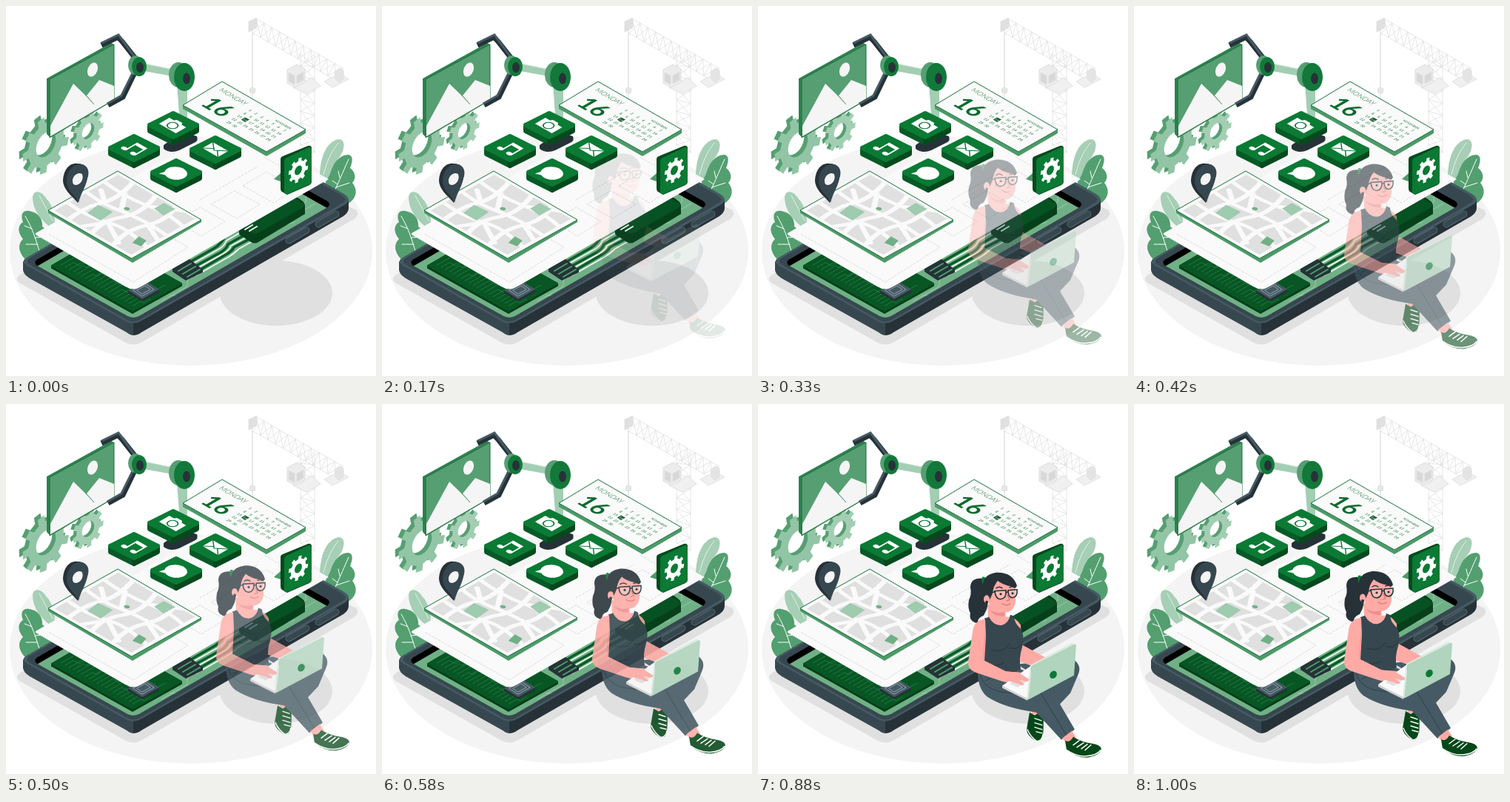
These frames come from a looping animation (500 px wide and 500 px high, 1040 ms). An HTML page:

```html
<!DOCTYPE html>
<html lang="en">
<head>
<meta charset="utf-8">
<title>Building an app</title>
<style>
html, body { margin: 0; width: 100%; height: 100%; overflow: hidden; background: #fff }
svg { display: block; width: 100vw; height: 100vh }
text { font-family: Lato, "Open Sans", sans-serif; fill: #0a6b2d }
.line { fill: none; stroke-linecap: round; stroke-linejoin: round }
</style>
</head>
<body>
<svg viewBox="0 0 500 500">
  <ellipse cx="250" cy="331" rx="245" ry="155" fill="#f4f4f4"/>
  <path d="M18 364L300 200L472 275Q480 281 470 288L184 454Q172 461 160 454L18 374Q12 369 18 364Z" fill="#e0e0e0"/>
  <ellipse cx="365" cy="388" rx="76" ry="44" fill="#e0e0e0"/>

  <!-- crane -->
  <g stroke="#e0e0e0">
    <g id="crane" class="line"></g>
    <path d="M328 21L339 16V29L328 35Z" fill="#e0e0e0"/>
    <path class="line" d="M333 30V110M333 117V130" stroke-width="1.4"/>
    <circle cx="333" cy="114" r="4" fill="#e6e6e6"/>
    <path d="M388 110L413 97L425 108L406 119Z" fill="#f0f0f0"/>
    <path d="M380 86L393 79L404 85V103L391 110L380 104Z" fill="#ececec"/>
    <path d="M382 90L390 94V106L382 102ZM393 94L402 89V100L393 105Z" fill="#d8d8d8"/>
    <path d="M430 102L451 91L463 99L441 110Z" fill="#f0f0f0"/>
    <path d="M445 88L451 84L456 87V99L450 103L445 99Z" fill="#e4e4e4"/>
  </g>

  <!-- plants -->
  <g fill="#a6cfb5">
    <path d="M424 232C424 206 432 184 449 180C462 180 456 200 448 207C444 217 440 230 434 239Z"/>
    <path d="M64 302C46 290 36 274 36 259C37 247 49 250 55 261C60 265 65 277 66 292Z"/>
  </g>
  <g fill="#539f6f">
    <path d="M428 247C432 238 434 235 438 227C442 213 450 201 463 201C470 203 468 211 465 219C472 224 474 233 468 239C477 250 472 262 462 267L430 252Z"/>
    <path d="M26 342C15 331 17 320 23 315C15 305 16 296 23 292C18 279 25 274 35 278C46 280 50 292 49 298C58 304 64 318 59 326Z"/>
  </g>
  <g class="line" stroke="#fff">
    <path d="M441 256C448 242 455 225 463 207M451 232L449 223M448 241L441 236M446 245L464 239"/>
    <path d="M26 284C35 299 40 314 45 331M35 301L25 297M39 313L51 312M42 322L27 322"/>
    <path d="M429 228C433 211 440 196 449 185M45 256C51 268 58 280 63 290" stroke="#e3f0e8"/>
  </g>

  <!-- gears and picture -->
  <g id="gears"></g>
  <path d="M55 98L142 50L146 52L60 99V178L55 173Z" fill="#2f8150"/>
  <path d="M59 99L146 52V127L59 178Z" fill="#569f72" stroke="#17703a"/>
  <path d="M60 176V162L91 105L119 132L109 121L126 100L146 108V126Z" fill="#f5f5f5"/>
  <path d="M107 120L119 133" stroke="#569f72"/>
  <ellipse cx="117" cy="86" rx="6.5" ry="10" transform="rotate(22 117 86)" fill="#f5f5f5"/>

  <!-- phone -->
  <path d="M23 345V357Q24 363 32 368L163 441Q168 445 172 445V425Z" fill="#37474f"/>
  <path d="M172 445Q178 445 183 441L456 284Q463 279 463 273V261L172 425Z" fill="#263238"/>
  <path d="M28 340L307 178Q315 174 323 178L457 254Q469 262 457 269L182 426Q172 431 162 426L29 351Q19 345 28 340Z" fill="#455a64"/>
  <path d="M31 341L307 181Q315 177 323 181L454 256Q463 262 454 267L181 424Q172 429 163 424L31 349Q26 345 31 341Z" fill="#37474f"/>
  <clipPath id="screen"><path d="M43 342L297 195Q304 191 311 195L433 263Q441 268 433 273L180 419Q172 423 164 419L42 351Q36 346 43 342Z"/></clipPath>
  <g clip-path="url(#screen)">
    <path d="M0 150H500V450H0Z"/>
    <path d="M38 354L304 200L441 277L172 432Z" fill="#70b086"/>
    <path d="M62 351L127 313L237 375V378L171 415L62 354Z" fill="#063c18" stroke="#063c18" stroke-linejoin="round" stroke-width="2"/>
    <path d="M62 351L127 313L237 375L171 412Z" fill="#075623" stroke="#075623" stroke-linejoin="round" stroke-width="2"/>
    <g id="traces" class="line" stroke="#2e8750" stroke-width=".7"></g>
    <path class="line" d="M210 399L245 379V370L268 358M222 391L246 391M358 292L405 265V257M368 303L368 295L418 267M344 306L390 292M275 370L320 344L328 346" stroke="#9bcaab"/>
    <g class="line" stroke-width="3.5">
      <path d="M238 352L282 327Q290 322 296 312L322 297M246 357L290 333Q298 328 300 322L332 304M253 362L297 336Q306 331 308 326L346 306" stroke="#0b5b28"/>
      <path d="M242 354L285 330Q294 326 298 317L327 300M250 359L293 335Q302 330 304 324L339 305M257 364L301 339Q309 334 315 328L351 308" stroke="#f3f8f5" stroke-width="1.8"/>
    </g>
    <path d="M225 355L248 342L266 356V360L243 371L225 359Z" fill="#263238"/>
    <path class="line" d="M233 358L250 348M239 362L256 352M245 366L262 356" stroke="#4aa068" stroke-width="2"/>
    <path d="M165 385L188 372L207 384V387L184 399L165 388Z" fill="#263238"/>
    <path d="M165 384L188 371L207 383L184 396Z" fill="#455a64"/>
    <path class="line" d="M172 384L188 375L200 383L184 392ZM177 384L188 378L195 383L184 389Z" stroke="#a8b5ba" stroke-width=".8"/>
  </g>
  <path d="M315 294L384 258Q390 256 396 260L401 264Q404 266 404 271V281L341 319Q336 322 331 319L317 310Q314 308 315 304Z" fill="#06401a"/>
  <path d="M316 293L384 257L402 267Q405 270 400 273L342 306Q336 309 331 306Z" fill="#075222"/>
  <path class="line" d="M323 302L333 296M329 304L339 298" stroke="#fff" stroke-width="2"/>
  <g class="line" stroke-width="9">
    <path d="M382 317L406 303M422 295L446 281" stroke="#53666f"/>
    <path d="M382 317L406 303M422 295L446 281" stroke="#37474f" stroke-width="7"/>
  </g>

  <!-- sheet -->
  <path d="M40 307L302 158L436 234L183 379Q172 386 161 379L40 309Z" fill="#fafafa"/>
  <g class="line" stroke="#d9d9d9" stroke-width=".9" stroke-dasharray="3 2">
    <path d="M59 309L172 373L246 326L222 312M277 268L309 250L343 268L312 287ZM230 290L262 272L296 291L264 311ZM320 243L352 224L393 247L362 266ZM262 262L340 217M350 205L400 233"/>
  </g>

  <!-- robot arm -->
  <path d="M213 188V193Q222 200 234 195L256 184Q260 181 258 176L238 170Z" fill="#263238"/>
  <path d="M231 106H245V160H235Z" fill="#a3ceb3"/>
  <path d="M187 78L231 87V96L187 88Z" fill="#a3ceb3"/>
  <path d="M187 78L231 87" stroke="#c4e0ce"/>
  <ellipse cx="233" cy="93" rx="13" ry="17" fill="#569f72"/>
  <ellipse cx="241" cy="96" rx="14" ry="19" fill="#12793a"/>
  <ellipse cx="244" cy="98" rx="5" ry="7.5" fill="#263238"/>
  <g class="line" stroke-width="7" style="stroke-linejoin:miter;stroke-linecap:butt">
    <path d="M129 53L151 42L157 48L175 71M138 134L158 123L173 92" stroke="#263238"/>
    <path d="M129 50L152 39L174 69M137 132L156 121L171 91" stroke="#455a64" stroke-width="3"/>
  </g>
  <ellipse cx="175" cy="80" rx="10" ry="13" fill="#569f72"/>
  <ellipse cx="180" cy="82" rx="10" ry="13" fill="#12793a"/>
  <ellipse cx="181" cy="83" rx="5" ry="7" fill="#263238"/>

  <!-- calendar -->
  <path d="M239 134L352 197L405 167V172L352 203L239 139Z" fill="#4d9a69"/>
  <path d="M239 134L292 102L405 167L352 197Z" fill="#fafafa" stroke="#17703a"/>
  <g id="calendar"></g>

  <g id="tiles"></g>

  <!-- map -->
  <path d="M57 276L170 341L264 289V292L171 347L57 280Z" fill="#4d9a69"/>
  <path d="M57 276L151 223L264 289L170 341Z" fill="#fafafa"/>
  <clipPath id="sheet"><path d="M4 4H96V96H4Z"/></clipPath>
  <g transform="matrix(.94 -.53 1.13 .65 57 276)" clip-path="url(#sheet)">
    <path d="M4 4H96V96H4Z" fill="#e0e0e0"/>
    <path class="line" d="M0 22Q30 18 48 24T100 20M0 51Q25 42 45 51T100 47M0 76Q30 66 52 74T100 70M24 0Q20 30 28 48T24 100M52 0Q46 20 52 44T54 100M77 0Q72 30 78 55T76 100M0 35L28 48M52 44L77 28M54 74L40 100M28 48L10 76M78 55L100 85M52 24L64 10" stroke="#fafafa" stroke-width="5"/>
    <path d="M25 26L43 24L45 40L25 42ZM79 61H93L94 74H77Z" fill="#9fcbaf"/>
    <path d="M20 84L33 81V90L22 93Z" fill="#71b087"/>
    <circle cx="59" cy="45" r="2.6" fill="#71b087"/>
  </g>
  <path class="line" d="M57 276L151 223L264 289L170 341Z" stroke="#17703a"/>

  <!-- pin -->
  <path fill-rule="evenodd" d="M97 266C90 257 77 249 77 235C78 220 87 211 97 213C109 213 113 222 110 232C107 246 99 253 97 266ZM95 242C102 241 106 233 103 227C96 223 89 231 89 237Q90 242 95 242Z" fill="#263238"/>
  <path fill-rule="evenodd" d="M98 266C94 255 82 250 82 236C83 222 92 212 102 214C112 216 113 225 110 233C107 247 101 253 98 266ZM95 243C103 240 106 231 102 226C95 224 89 231 90 238Q91 243 95 243Z" fill="#37474f"/>

  <!-- settings -->
  <path d="M362 234L372 225L377 239Z" fill="#4d9a69"/>
  <path d="M371 207Q371 204 374 203L408 189Q412 188 413 191V238Q413 240 410 242L380 255L373 251Q371 250 371 246Z" fill="#06491d"/>
  <path d="M376 210Q376 206 379 205L409 191Q413 190 413 194V236Q413 239 410 241L380 254Q376 255 376 251Z" fill="#0a7a34"/>
  <g id="settings"></g>

  <!-- woman -->
  <g id="woman" opacity="0">
    <path d="M350 350L424 342Q438 350 433 363L422 389L386 427L363 407L395 378Z" fill="#455a64"/>
    <path d="M371 405L382 409L381 419L370 417Z" fill="#ffaaa5"/>
    <path d="M367 415L374 419L384 413Q387 429 385 446Q384 455 376 454Q363 446 363 438Z" fill="#064719"/>
    <path class="line" d="M364 438Q368 448 377 454Q384 453 385 445M374 423L383 426M374 429L384 432M374 435L384 438M376 441L384 443" stroke="#fff" stroke-width="1.4"/>
    <path d="M354 322L394 344Q401 351 391 354L375 354L350 345Z" fill="#ffaaa5"/>
    <path d="M297 356L347 354Q372 360 382 384Q394 382 400 390L428 438L410 452L376 415Q333 409 310 394Q296 383 297 356Z" fill="#455a64"/>
    <path class="line" d="M300 364Q304 380 323 386Q347 391 370 390M381 387L417 446M307 372L314 369" stroke="#2f3e46" stroke-width=".9"/>
    <path d="M411 450L424 440L430 449L418 458Z" fill="#ffaaa5"/>
    <path d="M415 453Q421 457 426 448Q437 455 451 457Q464 459 464 465Q461 474 444 476Q430 476 417 466Z" fill="#064719"/>
    <path class="line" d="M416 465Q430 475 444 474Q458 473 463 466M426 459L434 453M431 462L440 456M437 464L445 458M442 466L450 459" stroke="#fff" stroke-width="1.5"/>

    <path d="M306 234Q287 232 287 246Q289 255 285 263Q283 274 287 281Q284 292 298 295Q295 288 305 284Q314 270 310 251Z" fill="#263238"/>
    <path d="M303 232Q308 230 309 238L306 244Q301 240 303 232Z" fill="#0a7a34"/>
    <path d="M310 268L334 276L335 286Q347 284 355 297L356 320H299L302 291L311 287Z" fill="#ffaaa5"/>
    <path d="M313 276Q323 283 333 279L333 285Q319 286 313 276Z" fill="#ee8f8c"/>
    <path d="M306 288L312 286Q319 299 330 297Q339 294 341 283L346 285Q346 294 355 302Q361 312 357 327Q352 342 355 356Q334 370 301 361L303 330Z" fill="#37474f"/>
    <path class="line" d="M315 330Q331 336 339 323M341 328Q352 331 356 322M312 350Q323 354 332 348" stroke="#263238" stroke-width=".9"/>
    <path d="M307 289Q292 290 290 306L284 347Q283 357 294 361L330 373L350 378Q359 377 366 373L365 367L354 361L336 360L306 345L308 312Z" fill="#ffaaa5"/>
    <path class="line" d="M307 310L304 345" stroke="#ee8f8c" stroke-width=".8"/>

    <path d="M310 250Q306 228 328 230Q346 231 348 247V265Q346 279 334 280Q319 280 312 267Z" fill="#ffaaa5"/>
    <path d="M304 245Q303 229 322 226Q344 225 350 244Q348 249 343 245Q329 242 324 237Q318 244 317 254L314 261L310 267Q305 255 304 245Z" fill="#263238"/>
    <ellipse cx="309" cy="262" rx="4" ry="5.5" fill="#ffaaa5"/>
    <circle cx="309" cy="266" r="2" fill="#263238"/>
    <path class="line" d="M322 247Q326 244 330 247M340 246Q344 244 347 246M312 254L320 252M335 253L338 252" stroke="#263238" stroke-width="1.5"/>
    <path d="M320 251L335 250Q336 261 328 262Q321 262 320 251ZM338 250L350 249Q351 259 344 260Q338 260 338 250Z" fill="#fff" fill-opacity=".2" stroke="#263238" stroke-width="1.6"/>
    <circle cx="328" cy="255" r="1.6" fill="#263238"/><circle cx="344" cy="254" r="1.6" fill="#263238"/>
    <path class="line" d="M337 256L340 263L336 264M330 268Q336 272 341 268" stroke="#d56f70" stroke-width="1.2"/>

    <path d="M330 379L369 352L370 390L364 398Z" fill="#fafafa"/>
    <path d="M330 379L364 396V399L330 382Z" fill="#d3d3d3"/>
    <path d="M340 376L354 367L365 372L351 381Z" fill="#e0e0e0"/>
    <path d="M331 359L352 361L366 370Q367 374 361 373L353 371L360 377Q357 380 351 376L336 372Z" fill="#ffaaa5"/>
    <path d="M370 352L427 323Q430 322 430 325L427 365L365 398Z" fill="#b0d4bd"/>
    <path d="M370 352L427 323L425 321L368 351L363 397H365Z" fill="#d8eadf"/>
    <ellipse cx="399" cy="364" rx="4.5" ry="5.5" transform="rotate(35 399 364)" fill="#0a7a34"/>
  </g>
</svg>
<script>
const $ = id => document.getElementById(id);
const flat = (x, y) => `transform="matrix(.87 .5 -.87 .5 ${x} ${y})"`;

// Lattice between two parallel edges, each given as [x1, y1, x2, y2]
function truss(a, b, n) {
  const at = ([x, y, u, v], k) => `${x + (u - x) * k} ${y + (v - y) * k}`;
  let d = `M${at(a, 0)}L${at(a, 1)}M${at(b, 0)}L${at(b, 1)}`;
  for (let i = 0; i < n; i++) {
    const p = i / n, q = (i + 1) / n;
    d += `M${at(a, p)}L${at(b, q)}L${at(a, q)}M${at(b, p)}L${at(a, q)}`;
  }
  return `<path d="${d}" stroke-width=".8"/>`;
}
$('crane').innerHTML = truss([338, 17, 455, 84], [334, 37, 445, 100], 11) +
  truss([398, 65, 398, 188], [417, 65, 417, 198], 8);

function gear(r, n, hole, turn = 0) {
  const points = [];
  for (let i = 0; i < n; i++)
    for (const [k, s] of [[-.27, .77], [-.2, 1], [.2, 1], [.27, .77]]) {
      const a = (i + k) / n * 2 * Math.PI + turn;
      points.push(`${(r * s * Math.cos(a)).toFixed(1)} ${(r * s * Math.sin(a)).toFixed(1)}`);
    }
  return `M${points.join('L')}ZM${hole} 0A${hole} ${hole} 0 1 0 ${-hole} 0A${hole} ${hole} 0 1 0 ${hole} 0Z`;
}
const wall = (d, x, y, fill) =>
  `<path d="${d}" fill-rule="evenodd" fill="${fill}" transform="matrix(.83 -.43 0 1 ${x} ${y})"/>`;
const big = gear(38, 9, 16, .3), small = gear(25, 9, 10, .1);
$('gears').innerHTML = wall(big, 49, 184, '#569f72') + wall(big, 54, 187, '#92c5a5') +
  wall(small, 107, 167, '#569f72') + wall(small, 111, 169, '#a3ceb3');
$('settings').innerHTML = wall(gear(16, 8, 6, .2), 395, 222, '#fff');

let traces = '';
for (let i = 1; i < 20; i++) {
  const x = 62 + i * 5.4, y = 351 + i * 3.05, len = 14 + i * 17 % 29;
  traces += `M${x + 7} ${y - 4}l${len * .6} ${-len * .34}l${i % 3 * 4} ${i % 3 * 2.3}l${len * .5} ${-len * .29}`;
}
$('traces').innerHTML = `<path d="${traces}"/>`;

const label = (text, x, y, size, weight) =>
  `<text ${flat(x, y)} font-size="${size}" font-weight="${weight}">${text}</text>`;
let days = '<path d="M318 153.500L323 150.500L329 153.500L323 157Z" fill="#075623"/>';
for (let i = 0; i < 30; i++) {
  const col = i % 7, row = Math.floor(i / 7);
  days += `<text ${flat(328.5 + col * 7.7 - row * 7.2, 142 + col * 4.5 + row * 4.1)} font-size="5" text-anchor="middle"` +
    `${i == 15 ? ' style="fill:#fff"' : ''}>${i + 1}</text>`;
}
$('calendar').innerHTML = label('MONDAY', 287, 114, 9.3, 300) + label('16', 261, 133, 31, 700) +
  label('NOVEMBER', 363, 155, 4.2, 400) + days;

function tile(x, y, icon) {
  const edge = c => `fill="${c}" stroke="${c}" stroke-width="6" stroke-linejoin="round"`;
  return `<path d="M${x - 32} ${y}V${y + 8}L${x} ${y + 24}V${y + 16}Z" ${edge('#075a25')}/>
    <path d="M${x + 32} ${y}V${y + 8}L${x} ${y + 24}V${y + 16}Z" ${edge('#06491d')}/>
    <path d="M${x - 32} ${y}L${x} ${y - 16}L${x + 32} ${y}L${x} ${y + 16}Z" ${edge('#0a7a34')}/>
    <g ${flat(x, y)} fill="#fff" stroke="#0a7a34">${icon}</g>`;
}
$('tiles').innerHTML =
  tile(226, 161, '<path d="M-13 -7H-6L-4 -10H4L6 -7H13V9H-13Z" stroke="none"/><circle cy="1" r="6" stroke-width="1.500"/><circle cy="1" r="3.500" stroke="none"/>') +
  tile(173, 192, '<g stroke="#fff"><path d="M-4 8V-9H10V8" fill="none" stroke-width="2"/><path d="M-4 -7H10" stroke-width="4"/><ellipse cx="-7" cy="8" rx="3.500" ry="2.500"/><ellipse cx="7" cy="8" rx="3.500" ry="2.500"/></g>') +
  tile(283, 194, '<path d="M-12 -8H12V8H-12Z" stroke="none"/><path d="M-12 -8L0 2L12 -8M-12 8L-3 0M12 8L3 0" fill="none" stroke-width="1.200"/>') +
  tile(230, 225, '<path d="M-5 12L-12 15L-10 8A13 12 0 1 1 -5 12Z" stroke="none"/>');

// Cubic Bezier easing that overshoots slightly before it settles
function ease(x) {
  const curve = (s, a, b) => 3 * (1 - s) ** 2 * s * a + 3 * (1 - s) * s * s * b + s ** 3;
  let low = 0, high = 1;
  for (let i = 0; i < 20; i++) {
    const mid = (low + high) / 2;
    curve(mid, .36, .5) < x ? low = mid : high = mid;
  }
  return curve(low, -.01, 1.38);
}

const LOOP = 1040, SLIDE = 1000, DROP = 30;
const start = performance.now();
function draw() {
  const t = (performance.now() - start) % LOOP;
  const k = ease(Math.min(1, t / SLIDE));
  const woman = $('woman');
  woman.setAttribute('opacity', Math.min(1, Math.max(0, k)));
  woman.setAttribute('transform', `translate(0 ${DROP * (k - 1)})`);
  requestAnimationFrame(draw);
}
draw();
</script>
</body>
</html>
```
